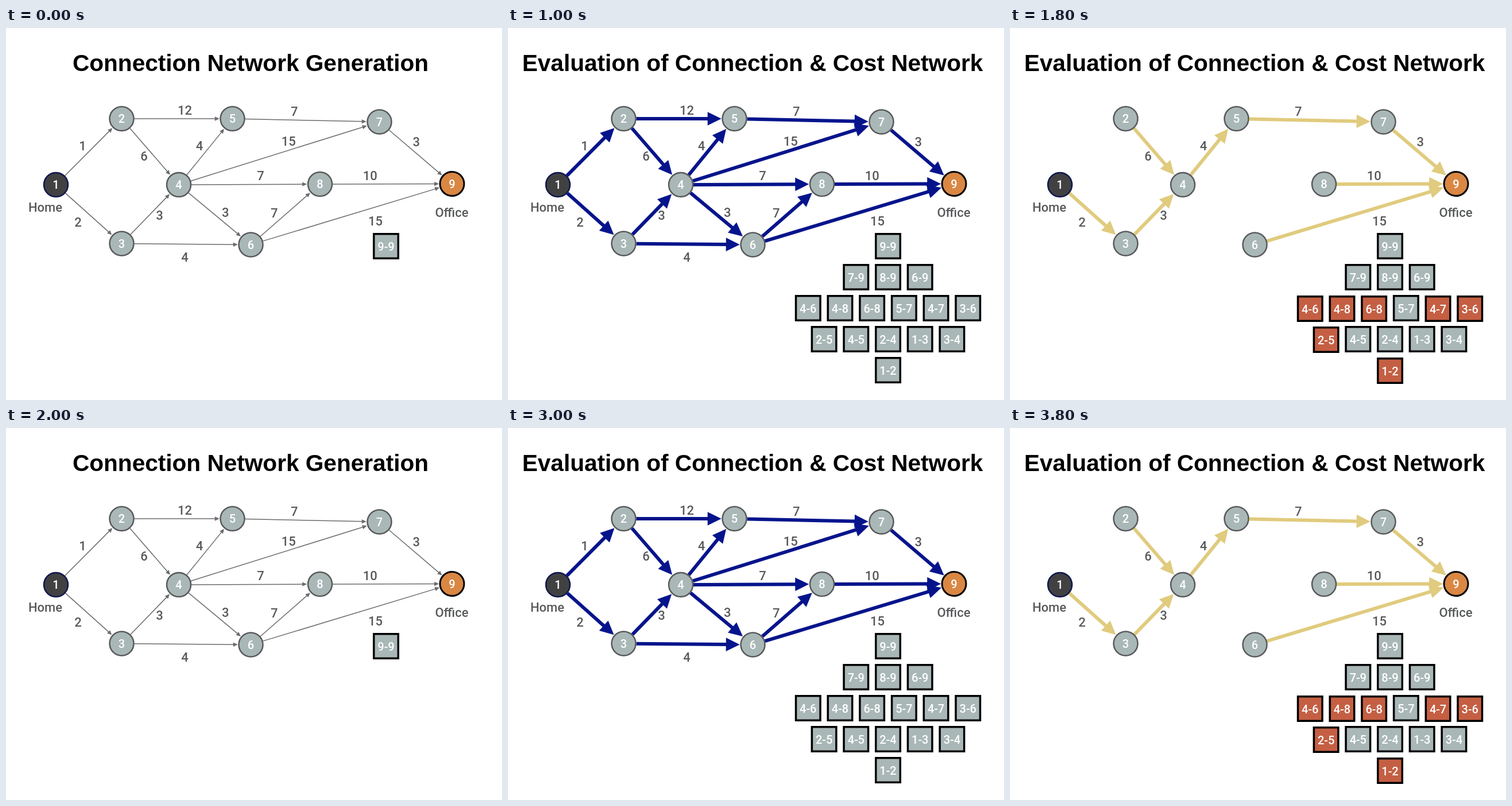
An HTML page that plays this animation: 864 by 648 pixels, repeating every 4 s.

```html
<!DOCTYPE html>
<html lang="en">
<head>
<meta charset="utf-8">
<title>Connection network</title>
<style>
  html, body { margin: 0; width: 100%; height: 100%; overflow: hidden; background: #fff; }
  svg { display: block; width: 864px; height: 648px; }
  text { font: 500 22px Roboto, sans-serif; text-anchor: middle; fill: #58595b; }
  .title { font: bold 40.6px "Liberation Sans", Arial, sans-serif; fill: #000; }
  .light { font-size: 20px; fill: #fff; }
</style>
</head>
<body>
<svg id="stage" viewBox="0 0 864 648"></svg>
<script>
const STEP = 200, STEPS = 10, EVALUATE = 5, HOME = 1, GOAL = 9;
const GREY = '#6b6c6e', BLUE = '#06148c', YELLOW = '#e0cb7e', RED = '#c55f43', SAGE = '#a9b8b7';

const nodes = {
  1: [87, 273], 2: [201.5, 158], 3: [201.5, 375.5], 4: [301, 273], 5: [394.5, 158],
  6: [426.5, 377.5], 7: [650.5, 163.5], 8: [547, 272], 9: [777, 271.5]
};

// Each link: from-to:cost, label place along it in percent, side of the label
const gaps = { above: -15, near: 13, below: 23 };
const hops = { [GOAL]: 0 };
const links = `7-9:3 43 above, 8-9:10 38 above, 6-9:15 60 below,
  4-6:3 57 above, 4-8:7 58 above, 6-8:7 42 above, 5-7:7 42 above, 4-7:15 56 above, 3-6:4 49 below,
  2-5:12 57 above, 4-5:4 51 above, 2-4:6 49 near, 1-3:2 47 below, 3-4:3 57 near,
  1-2:1 50 above`.split(',').map(entry => {
  const [from, to, cost, place, side] = entry.trim().split(/[-: ]/);
  const row = hops[to] + 1;
  hops[from] ??= row;
  return { from, to, row, cost: +cost, at: place / 100, gap: gaps[side] };
});

// Cheapest known cost from each node to the goal, using links up to a row
function reachable(row) {
  const reach = { [GOAL]: 0 };
  const via = ({ to, cost }) => cost + (reach[to] ?? Infinity);
  for (const link of links.filter(l => l.row <= row))
    reach[link.from] = Math.min(reach[link.from] ?? Infinity, via(link));
  return via;
}

const text = (s, x, y, cls = '', size = 22) =>
  `<text class="${cls}" x="${x}" y="${y + size * 0.356}">${s}</text>`;

function line({ from, to }) {
  const [x, y] = nodes[from], [x2, y2] = nodes[to];
  return { x, y, dx: x2 - x, dy: y2 - y, length: Math.hypot(x2 - x, y2 - y) };
}

function label(link) {
  const { x, y, dx, dy, length } = line(link);
  const shift = link.gap / length;
  return text(link.cost, x + dx * link.at - dy * shift, y + dy * link.at + dx * shift);
}

function arrow(link, color, thick) {
  const { x, y, dx, dy, length } = line(link);
  const [width, head, half] = thick ? [6, 24, 11.8] : [1.5, 8, 3.7];
  const tip = length - 22.8, neck = tip - head;
  return `<g transform="translate(${x} ${y}) rotate(${Math.atan2(dy, dx) * 180 / Math.PI})"
    fill="${color}"><path d="M22 0H${neck + 1}" stroke="${color}" stroke-width="${width}"/>
    <path d="M${tip} 0L${neck} ${-half}V${half}Z"/></g>`;
}

const box = (name, x, y, fill) =>
  `<rect x="${x - 21.25}" y="${y - 21.25}" width="42.5" height="42.5" fill="${fill}"
    stroke="#000" stroke-width="3.5"/>` + text(name, x, y + 0.8, 'light', 20);

function node([id, [x, y]]) {
  const [fill, stroke, width] =
    id == HOME ? ['#414142', '#10174f', 2.5] :
    id == GOAL ? ['#da8744', '#000', 3] : [SAGE, '#58595b', 2.5];
  return `<circle cx="${x}" cy="${y}" r="21" fill="${fill}" stroke="${stroke}"
    stroke-width="${width}"/>` + text(id, x, y, 'light', 20);
}

function scene(step) {
  const judgedRow = step - EVALUATE, via = reachable(judgedRow);
  let labels = '', arrows = '', boxes = box(`${GOAL}-${GOAL}`, 662, 380, SAGE);
  for (const link of links) {
    const { from, to, row } = link;
    const built = step >= row, judged = judgedRow >= row;
    const dropped = judged && links.some(l => l.from === from && via(l) < via(link));
    if (built) {
      const peers = links.filter(l => l.row === row);
      const column = peers.indexOf(link) - (peers.length - 1) / 2;
      boxes += box(`${from}-${to}`, 662 + column * 55.7, 380 + row * 54 + dropped,
        dropped ? RED : SAGE);
    }
    if (dropped) continue;
    labels += label(link);
    arrows += arrow(link, judged ? YELLOW : built ? BLUE : GREY, built);
  }
  const title = step < EVALUATE ? 'Connection Network Generation'
    : 'Evaluation of Connection &amp; Cost Network';
  return text(title, 426, 60.4, 'title', 41) + labels +
    text('Home', 68.5, 312) + text('Office', 776.5, 321) +
    arrows + Object.entries(nodes).map(node).join('') + boxes;
}

const stage = document.getElementById('stage');
let shown = -1;
function tick() {
  const step = Math.floor(performance.now() / STEP) % STEPS;
  if (step !== shown) stage.innerHTML = scene(shown = step);
  requestAnimationFrame(tick);
}
tick();
</script>
</body>
</html>
```
